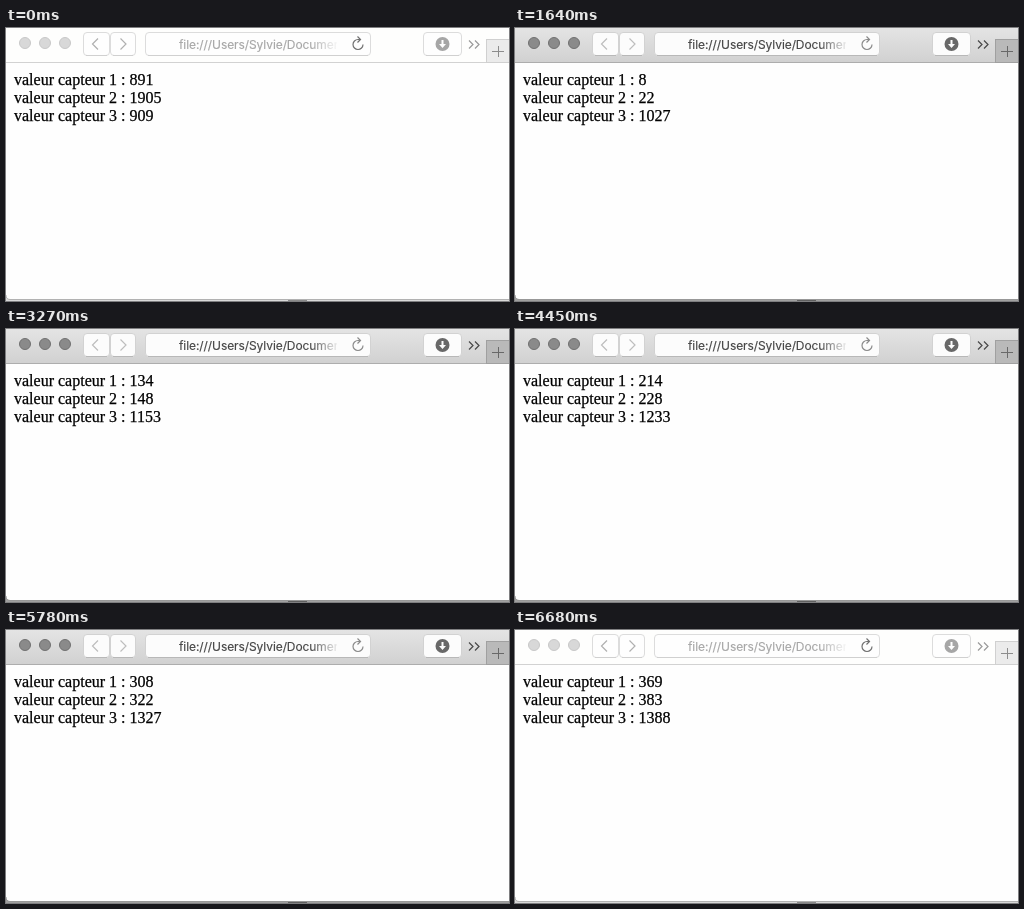
Animation, 503 px wide and 273 px high, one loop 6.77 s. Source, as an HTML page:

```html
<!DOCTYPE html>
<html lang="fr">
<head>
<meta charset="utf-8">
<title>Valeurs capteurs</title>
<style>
html, body { margin: 0; width: 100%; height: 100%; overflow: hidden; background: #fefefe; }
svg { display: block; }
svg {
  --top: #fefefd; --bottom: #fefefd; --edge: #d2d2d2;
  --light: #d8d8d8; --ring: #c8c8c8;
  --button: #fefefe; --rim: #dcdcdc; --shade: #d0d0d0; --chevron: #b0b0b0;
  --url: #a6a6a6; --icon: #a6a6a6; --more: #999; --reload: #707070;
  --tab: #ebebeb; --tabEdge: #d0d0d0; --plus: #8c8c8c; --base: #b2b2b2; --under: #d8d8d8; --mark: #8a8a8a;
}
svg.active {
  --top: #e4e4e4; --bottom: #d1d1d1; --edge: #adadad;
  --light: #8a8a8a; --ring: #707070;
  --button: #fcfcfc; --rim: #d2d2d2; --shade: #b8b8b8; --chevron: #bebebe;
  --url: #444; --icon: #686868; --more: #484848; --reload: #8a8a8a;
  --tab: #b9b9b9; --tabEdge: #a0a0a0; --plus: #686868; --base: #989898; --under: #a0a0a0; --mark: #606060;
}
.button { fill: var(--button); stroke: var(--rim); }
.shade { stroke: var(--shade); }
.line { fill: none; stroke-width: 1.2; }
.url { font: 12px Inter, sans-serif; letter-spacing: -.08px; fill: var(--url); stroke: var(--url); stroke-width: .15; }
.value { font: 16px "Liberation Serif", "Times New Roman", serif; stroke: #000; stroke-width: .25; }
</style>
</head>
<body>
<svg width="503" height="273">
  <defs>
    <linearGradient id="bar" x2="0" y2="1">
      <stop style="stop-color: var(--top)"/>
      <stop offset="1" style="stop-color: var(--bottom)"/>
    </linearGradient>
    <linearGradient id="fade" gradientUnits="userSpaceOnUse" x1="304" x2="334">
      <stop stop-color="#fff"/>
      <stop offset="1" stop-color="#000"/>
    </linearGradient>
    <mask id="cut" maskUnits="userSpaceOnUse" x="140" y="4" width="191" height="24">
      <rect x="140" y="4" width="191" height="24" fill="url(#fade)"/>
    </mask>
  </defs>

  <rect width="503" height="34" fill="url(#bar)"/>
  <rect y="34" width="503" height="1" fill="var(--edge)"/>

  <g fill="var(--light)" stroke="var(--ring)">
    <circle cx="19" cy="15" r="5.500"/>
    <circle cx="39" cy="15" r="5.500"/>
    <circle cx="59" cy="15" r="5.500"/>
  </g>

  <g class="button">
    <rect x="77.500" y="4.500" width="26" height="23" rx="3.500"/>
    <rect x="104.500" y="4.500" width="25" height="23" rx="3.500"/>
    <rect x="139.500" y="4.500" width="225" height="23" rx="3.500"/>
    <rect x="417.500" y="4.500" width="38" height="23" rx="3.500"/>
  </g>
  <path class="shade" d="M80 27.500h21M107 27.500h20M142 27.500h220M420 27.500h33"/>

  <path class="line" stroke="var(--chevron)" d="M92 10.500l-5.500 5.500 5.500 5.500M114.500 10.500l5.500 5.500-5.500 5.500"/>
  <text class="url" x="173" y="21" mask="url(#cut)">file:///Users/Sylvie/Documents</text>

  <path class="line" stroke="var(--reload)" d="M357 16.500a5 5 0 1 1-5-5h2M351.500 8.500l3 3-3 3"/>

  <circle cx="436.500" cy="16" r="7" fill="var(--icon)"/>
  <path d="M435.500 12h2v4h2.500l-3.500 4-3.500-4h2.500z" fill="var(--button)"/>
  <path class="line" stroke="var(--more)" d="M463 12.500l4 4-4 4M469 12.500l4 4-4 4"/>

  <rect x="480.500" y="11.500" width="24" height="23" fill="var(--tab)" stroke="var(--tabEdge)"/>
  <path stroke="var(--plus)" d="M486 23.500h12M492.500 18v11"/>

  <g class="value">
    <text x="8" y="57"></text>
    <text x="8" y="75"></text>
    <text x="8" y="93"></text>
  </g>

  <path d="M0 267q0 4 4 4H503v2H0z" fill="var(--under)"/>
  <path d="M0 267q0 4.500 4 4.500H503" fill="none" stroke="var(--base)"/>
  <path d="M282 272.500h19" stroke="var(--mark)"/>
</svg>
<script>
const LOOP = 6770;
const LAST = 45;
const SHORT_STEPS = new Set([10, 14, 18, 25, 29, 33, 37]);
const COUNTS = [[0, 909], [4, 950], [11, 1027], [22, 1153], [30, 1233], [39, 1327], [45, 1388]];
const ACTIVE_FROM = 2, ACTIVE_UNTIL = 44;

const stage = document.querySelector("svg");
const lines = document.querySelectorAll(".value text");

function stepAt(time) {
  let step = 0, end = 150;
  while (step < LAST && time >= end) {
    step++;
    end += SHORT_STEPS.has(step) ? 140 : 150;
  }
  return step;
}

function countAt(step) {
  const next = Math.max(1, COUNTS.findIndex(([at]) => at >= step));
  const [s0, c0] = COUNTS[next - 1], [s1, c1] = COUNTS[next];
  return Math.round(c0 + (c1 - c0) * (step - s0) / (s1 - s0));
}

function draw() {
  const step = stepAt(performance.now() % LOOP);
  const count = countAt(step);
  // Each sensor counts at the same pace and wraps at its own limit.
  const values = [(count - 18) % 1001, (count + 996) % 2001, count];
  values.forEach((value, i) => lines[i].textContent = `valeur capteur ${i + 1} : ${value}`);
  stage.classList.toggle("active", step >= ACTIVE_FROM && step < ACTIVE_UNTIL);
  requestAnimationFrame(draw);
}
draw();
</script>
</body>
</html>
```
